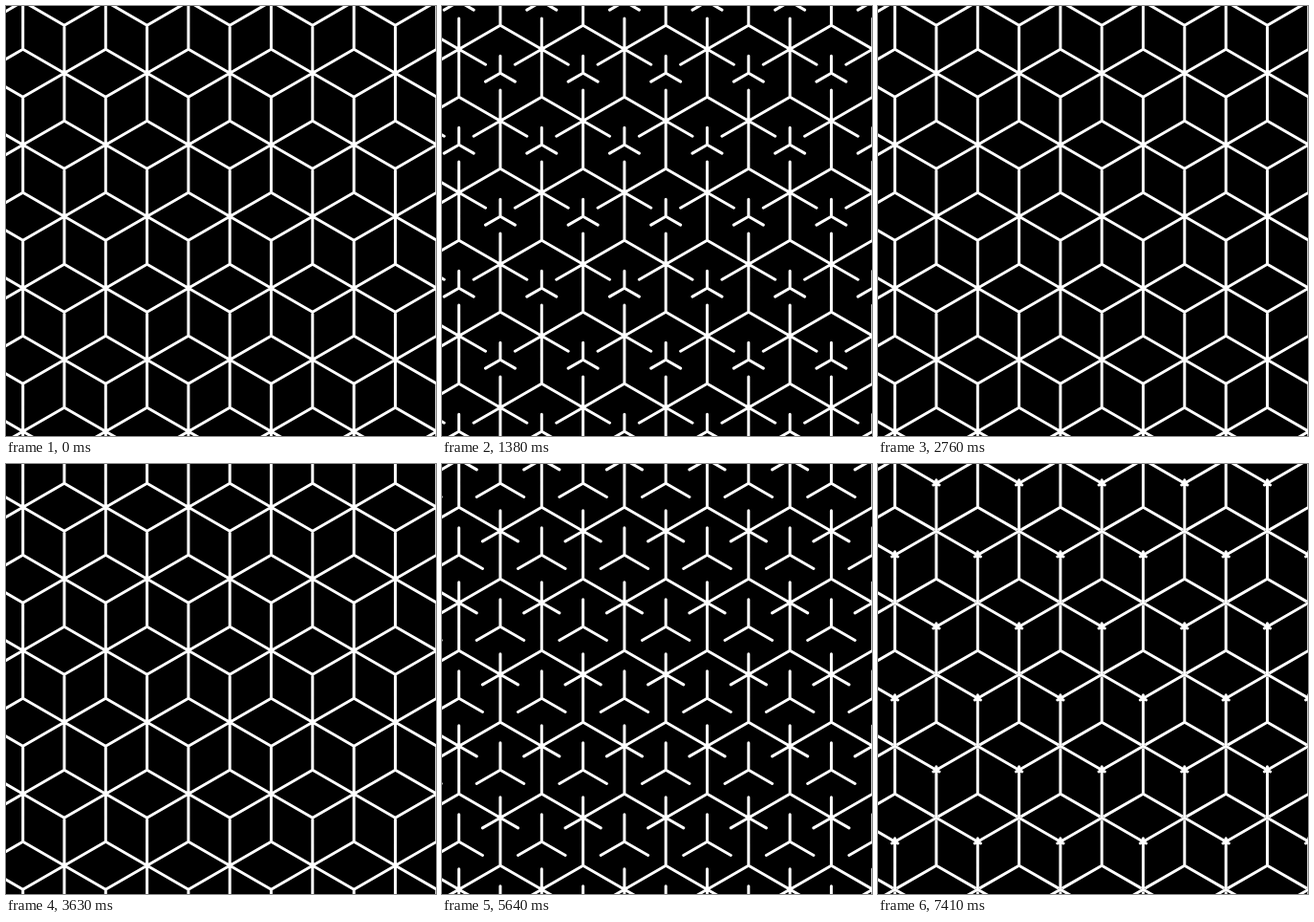
Recreate the animation shown at these times as an HTML page with a canvas. Size 450 by 450 pixels, loop 7440 ms.

```html
<!DOCTYPE html>
<html>
<head>
<meta charset="utf-8">
<style>
html, body { margin: 0; width: 100%; height: 100%; overflow: hidden; background: #000; }
canvas { display: block; }
</style>
</head>
<body>
<canvas id="stage" width="450" height="450"></canvas>
<script>
const ctx = document.getElementById('stage').getContext('2d');
const STEP = 30, STEPS = 248, MOVES = 9, MOVE_STEPS = 14;
const EDGE = 50, HALF = EDGE / 2, COL = EDGE * Math.sqrt(3) / 2;
const X0 = 17.7, Y0 = -4.8;
const DIRS = [[0, -EDGE], [-COL, HALF], [COL, HALF]];

const mod3 = n => ((n % 3) + 3) % 3;
const moveStart = i => 13 + 28 * i - Math.max(0, i - 5);

// Length of the spokes (0 to 1) for each of the three kinds of vertex.
function spokeLengths(step) {
  let i = 0;
  while (i < MOVES - 1 && moveStart(i + 1) <= step) i++;
  const p = Math.min(1, Math.max(0, (step - moveStart(i)) / MOVE_STEPS));
  const lengths = [1, 1, 1];
  lengths[mod3(1 - i)] = p;
  lengths[mod3(-i)] = 1 - p;
  return lengths;
}

function draw(step) {
  const lengths = spokeLengths(step);
  ctx.fillStyle = '#000';
  ctx.fillRect(0, 0, 450, 450);
  ctx.strokeStyle = '#fff';
  ctx.lineWidth = 3;
  ctx.lineCap = 'round';
  ctx.beginPath();
  for (let col = -1; col <= 11; col++) {
    const odd = col & 1;
    for (let row = -2; row <= 11; row++) {
      const len = lengths[mod3(odd - row)];
      if (!len) continue;
      const x = X0 + col * COL, y = Y0 + row * EDGE + odd * HALF;
      for (const [dx, dy] of DIRS) {
        ctx.moveTo(x, y);
        ctx.lineTo(x + dx * len, y + dy * len);
      }
    }
  }
  ctx.stroke();
}

function tick() {
  draw(Math.floor(performance.now() / STEP) % STEPS);
  requestAnimationFrame(tick);
}
tick();
</script>
</body>
</html>
```
